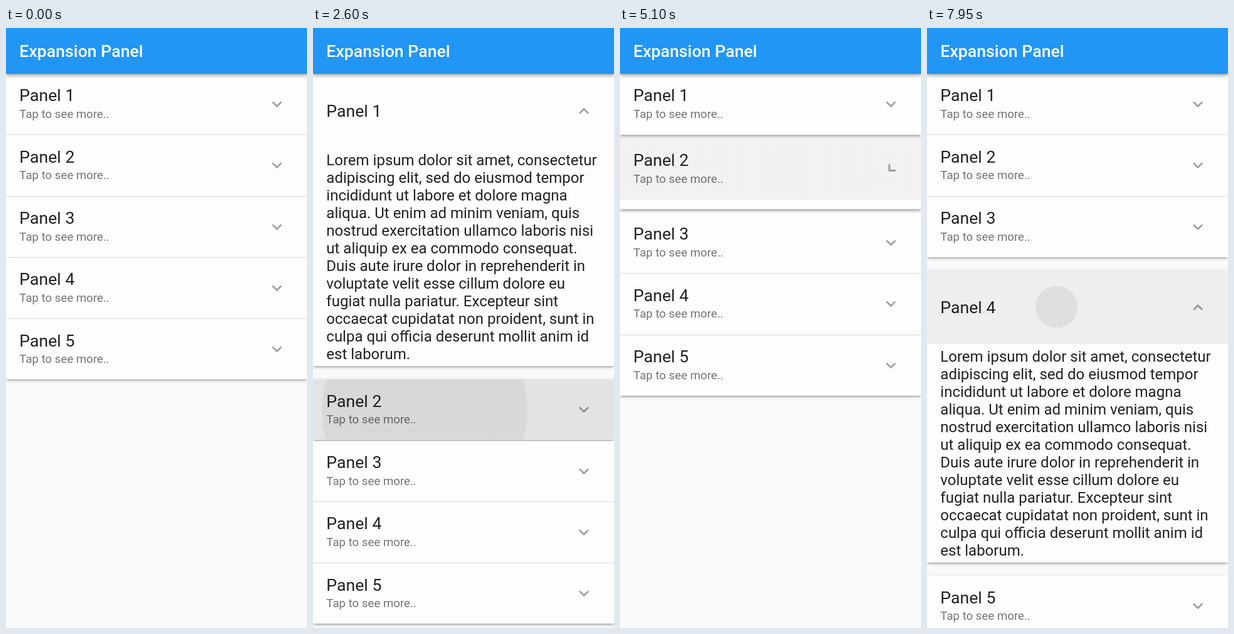
An HTML page that plays this animation: 480x953 px, repeating every 8 s.

```html
<!DOCTYPE html>
<html lang="en">
<head>
<meta charset="utf-8">
<title>Expansion Panel</title>
<style>
  html, body { margin: 0; width: 100%; height: 100%; overflow: hidden; }
  body { position: relative; background: #faf9fb; font-family: Roboto, sans-serif; color: rgba(0, 0, 0, .87); }
  .bar {
    position: absolute; z-index: 1; left: 0; top: 0; width: 100%; height: 73px;
    background: #2196f4; color: #fff;
    box-shadow: 0 2px 5px rgba(0, 0, 0, .3), 0 4px 7px rgba(0, 0, 0, .1);
  }
  .bar span { position: absolute; left: 21.33px; top: 21px; font-size: 26.67px; font-weight: 500; white-space: nowrap; }
  .list { position: absolute; z-index: 0; left: 0; top: 73px; width: 480px; height: 880px; }
  .panel {
    position: absolute; left: 0; width: 480px; box-sizing: border-box;
    background: #fefdfe; border-bottom: 1px solid transparent;
  }
  .panel::before {
    content: ""; position: absolute; z-index: -1; inset: 0 0 -1px; border-radius: inherit;
    box-shadow: 0 4px 2px -2.67px rgba(0, 0, 0, .2), 0 2.67px 3.5px rgba(0, 0, 0, .14), 0 1.33px 7.5px rgba(0, 0, 0, .12);
  }
  .panel > * { position: absolute; }
  .ink { left: 0; top: 0; width: 100%; }
  .title, .hint { left: 21.33px; white-space: nowrap; }
  .title { font-size: 26.67px; }
  .hint { font-size: 18.67px; color: rgba(0, 0, 0, .54); }
  .icon { left: 416px; width: 32px; height: 32px; fill: rgba(0, 0, 0, .38); }
  .body { left: 0; width: 100%; overflow: hidden; }
  .body p { margin: 5.8px 0 0 21.33px; font-size: 24px; line-height: 28px; white-space: pre; }
</style>
</head>
<body>
<div class="bar"><span>Expansion Panel</span></div>
<div class="list"></div>
<script>
const LOOP = 8000, FADE = 200, DP = 4 / 3, WIDTH = 480;
const ROW = 72 * DP, HEADER = 56 * DP, MARGIN = 32 * DP, GAP = 16 * DP, BODY = 346.5, DIVIDER = DP;
const NEVER = [Infinity, Infinity];

// Spans of time in which each panel, and the gap below it, is open.
const openSpans = [[999, 2975], [2975, 4951], NEVER, [6725, Infinity], NEVER];
const gapSpans = [[999, 4951], [2975, 4951], [6725, Infinity], [6725, Infinity], [-Infinity, Infinity]];
const presses = [
  { panel: 0, down: 350, up: 999, x: 200, y: 48, h: ROW },
  { panel: 1, down: 2065, up: 2975, x: 178, y: 49, h: ROW },
  { panel: 1, down: 4232, up: 4951, x: 244, y: 53.7, h: HEADER + MARGIN },
  { panel: 3, down: 5899, up: 6725, x: 203.5, y: 46, h: ROW },
  { panel: 3, down: 7832, up: Infinity, x: 206.5, y: 58, h: HEADER + MARGIN }
];

const lorem = `Lorem ipsum dolor sit amet, consectetur
adipiscing elit, sed do eiusmod tempor
incididunt ut labore et dolore magna
aliqua. Ut enim ad minim veniam, quis
nostrud exercitation ullamco laboris nisi
ut aliquip ex ea commodo consequat.
Duis aute irure dolor in reprehenderit in
voluptate velit esse cillum dolore eu
fugiat nulla pariatur. Excepteur sint
occaecat cupidatat non proident, sunt in
culpa qui officia deserunt mollit anim id
est laborum.`;

const clamp = v => Math.min(1, Math.max(0, v));

// cubic-bezier(.4, 0, .2, 1)
function ease(x) {
  if (x <= 0) return 0;
  if (x >= 1) return 1;
  let lo = 0, hi = 1;
  for (let i = 0; i < 24; i++) {
    const u = (lo + hi) / 2, v = 1 - u;
    if (1.2 * v * v * u + .6 * v * u * u + u * u * u < x) lo = u; else hi = u;
  }
  return lo * lo * (3 - 2 * lo);
}

// Linear progress that runs up when a span starts and back down when it ends.
const linear = (t, [from, to]) => t < to ? clamp((t - from) / FADE) : 1 - clamp((t - to) / FADE);
// Eased afresh in each direction.
const eased = (t, [from, to]) => t < to ? ease((t - from) / FADE) : 1 - ease((t - to) / FADE);

const list = document.querySelector('.list');
const panels = openSpans.map((_, i) => {
  const root = document.createElement('div');
  root.className = 'panel';
  root.innerHTML = `<div class="ink"></div>
    <div class="title">Panel ${i + 1}</div>
    <div class="hint">Tap to see more..</div>
    <svg class="icon" viewBox="0 0 24 24"><path d="M16.59 8.59 12 13.17 7.41 8.59 6 10l6 6 6-6z"/></svg>
    <div class="body"><p>${lorem}</p></div>`;
  list.append(root);
  const part = name => root.querySelector('.' + name).style;
  return { root: root.style, ink: part('ink'), title: part('title'), hint: part('hint'), icon: part('icon'), body: part('body') };
});

function inkBackground(t, panel) {
  const press = presses.find(p => p.panel === panel && t >= p.down && t < p.up + FADE);
  if (!press) return 'none';
  const { x, y, h, down, up } = press;
  const full = Math.hypot(Math.max(x, WIDTH - x), Math.max(y, h - y));
  const held = Math.min(t, up) - down, since = Math.max(0, t - up);
  const radius = Math.min(full, full * held / 1000 + since * DP);
  const left = 1 - since / FADE;
  const splash = `rgba(200, 200, 200, ${.4 * left})`;
  const highlight = `rgba(188, 188, 188, ${.4 * left * clamp((t - down) / FADE)})`;
  return `radial-gradient(circle at ${x}px ${y}px, ${splash} ${radius - .5}px, rgba(200, 200, 200, 0) ${radius + .5}px) ${highlight}`;
}

function render(t) {
  let top = 0, gapAbove = 1;
  panels.forEach((p, i) => {
    const span = openSpans[i], isOpen = t >= span[0] && t < span[1];
    const size = eased(t, span), progress = linear(t, span), gap = ease(linear(t, gapSpans[i]));
    const header = (isOpen ? HEADER : ROW) + MARGIN * size;
    const inset = MARGIN / 2 * size;
    const line = DIVIDER * (1 - gap);
    const height = header + BODY * size;
    const above = 2 * DP * gapAbove, below = 2 * DP * gap;

    p.root.top = top + 'px';
    p.root.height = height + line + 'px';
    p.root.borderRadius = `${above}px ${above}px ${below}px ${below}px`;
    p.root.borderBottomColor = `rgba(0, 0, 0, ${.14 * (1 - gap)})`;
    p.ink.height = header + 'px';
    p.ink.background = inkBackground(t, i);
    p.title.top = inset + (isOpen ? 22.1 : 18.4) + 'px';
    p.hint.top = inset + 53 + 'px';
    p.hint.visibility = isOpen ? 'hidden' : 'visible';
    p.icon.top = header / 2 - 16 + 'px';
    p.icon.transform = `rotate(${180 * ease(progress)}deg)`;
    p.body.top = header + 'px';
    p.body.height = BODY * size + 'px';
    p.body.opacity = ease((progress - .4) / .6);

    top += height + line + GAP * gap;
    gapAbove = gap;
  });
}

const start = performance.now();
function tick() {
  render((performance.now() - start) % LOOP);
  requestAnimationFrame(tick);
}
tick();
</script>
</body>
</html>
```
